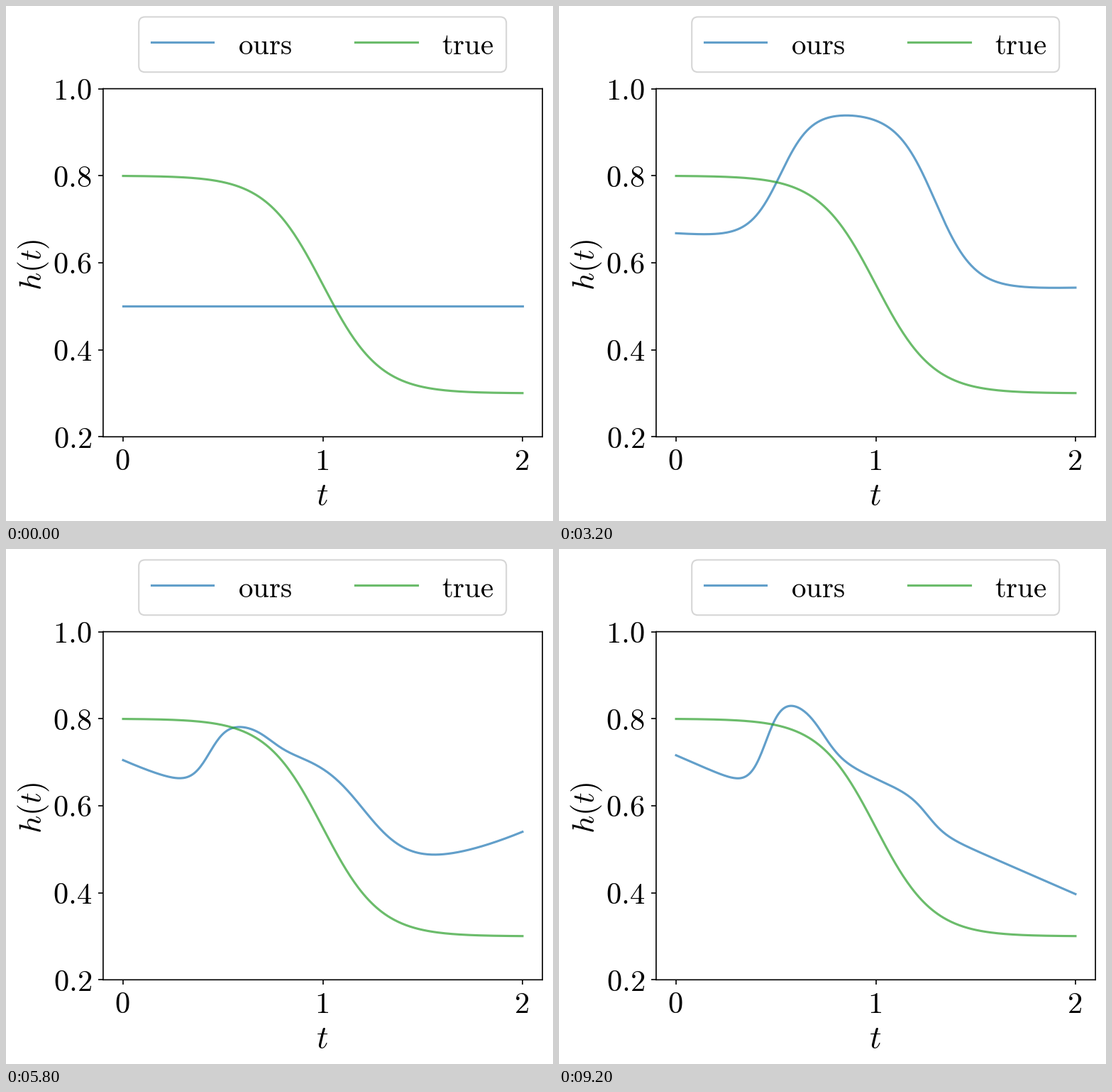
A matplotlib script for the animation above (9.4 s loop, 771 by 726 pixels).

```python
import numpy as np
import matplotlib.pyplot as plt
from matplotlib.animation import FuncAnimation
from matplotlib.lines import Line2D
from matplotlib.patches import FancyBboxPatch

W, H, DPI = 771, 726, 150
FRAMES, STEP_MS = 47, 200
BLUE, GREEN = "#1f77b4", "#2ca02c"
LEFT, RIGHT, TOP, BOTTOM = 136.9, 756.1, 116.6, 607.3

plt.rcParams["mathtext.fontset"] = "cm"

# The learned curve is a parabola plus smooth steps; each track gives
# a parameter's value at a few training steps, eased linearly between.
TRACKS = {
    "start": {0: .5, 3: .56, 5: .592, 11: .64, 21: .695, 38: .716},
    "slope": {0: 0, 3: .24, 5: .24, 11: .06, 21: -.12, 29: -.2, 38: -.22, 46: -.2},
    "bend": {0: 0, 3: -.12, 5: -.12, 11: -.03, 21: .05, 29: .0975, 38: .04, 46: 0},
    "rise": {0: 0, 3: .33, 5: .2, 11: .312, 14: .325, 18: .27, 21: .145,
             29: .17, 38: .23, 46: .245},
    "rise_at": {5: .53, 11: .57, 21: .475, 29: .432, 38: .45},
    "rise_width": {5: .13, 11: .09, 21: .065, 29: .048, 46: .043},
    "fall": {0: 0, 3: .47, 5: .3, 11: .394, 14: .43, 18: .375, 21: .275,
             29: .275, 38: .14, 46: .065},
    "fall_at": {5: 1.61, 11: 1.425, 21: 1.17, 29: 1.21, 38: 1.27, 46: 1.26},
    "fall_width": {5: .19, 11: .106, 21: .087, 29: .115, 38: .113, 46: .045},
    "dip": {21: 0, 29: .05, 38: .09, 46: .099},
}


def step(t, at, width):
    return 1 / (1 + np.exp((at - t) / width))


def learned(t, frame):
    p = {name: np.interp(frame, list(keys), list(keys.values()))
         for name, keys in TRACKS.items()}
    return (p["start"] + p["slope"] * t + p["bend"] * t ** 2
            + p["rise"] * step(t, p["rise_at"], p["rise_width"])
            - p["fall"] * step(t, p["fall_at"], p["fall_width"])
            - p["dip"] * step(t, .737, .05))


t = np.linspace(0, 2, 300)

fig = plt.figure(figsize=(W / DPI, H / DPI), dpi=DPI, facecolor="white")
ax = fig.add_axes([LEFT / W, 1 - BOTTOM / H, (RIGHT - LEFT) / W, (BOTTOM - TOP) / H])
ax.set(xlim=(-.1, 2.1), ylim=(.2, 1), xticks=[0, 1, 2],
       yticks=[.2, .4, .6, .8, 1])
ax.tick_params(labelbottom=False, labelleft=False, length=3.5, width=.8)
for edge in [*ax.spines.values(), *ax.get_xticklines(), *ax.get_yticklines()]:
    edge.set_snap(False)


def label(x, y, text, size=20.4, **kw):
    fig.text(x / W, 1 - y / H, f"${text}$", fontsize=size, va="baseline", **kw)


def legend_entry(x, text, color):
    fig.add_artist(Line2D([x / W, (x + 87.5) / W], [1 - 51.3 / H] * 2,
                          color=color, lw=1.5, alpha=.7))
    label(x + 122.5, 67.5, rf"\mathrm{{{text}}}", 19.7)


for v in (.2, .4, .6, .8, 1):
    y = BOTTOM - (v - .2) / .8 * (BOTTOM - TOP)
    label(120.8, y + 15.3, f"{v:.1f}", ha="right")
for v in (0, 1, 2):
    x = LEFT + (v + .1) / 2.2 * (RIGHT - LEFT)
    label(x - 1.7, 653.8, str(v), ha="center")
label(445.5, 703, "t", 22, ha="center")
label(50, 365, "h(t)", 21, ha="center", rotation=90, rotation_mode="anchor")

fig.add_artist(FancyBboxPatch(
    (187.2, H - 93.2), 518, 77.8, transform=None,
    boxstyle="round,pad=0,rounding_size=8.75",
    fc="white", ec="0.8", lw=1, alpha=.8))
legend_entry(204.7, "ours", BLUE)
legend_entry(492, "true", GREEN)

ours, = ax.plot(t, learned(t, 0), color=BLUE, lw=1.5, alpha=.7)
ax.plot(t, .8 - .5 * step(t, 1, 1 / 7), color=GREEN, lw=1.5, alpha=.7)


def update(i):
    ours.set_ydata(learned(t, i))
    return ours,


anim = FuncAnimation(fig, update, frames=FRAMES, interval=STEP_MS,
                     repeat=True, repeat_delay=0)
plt.show()
```
